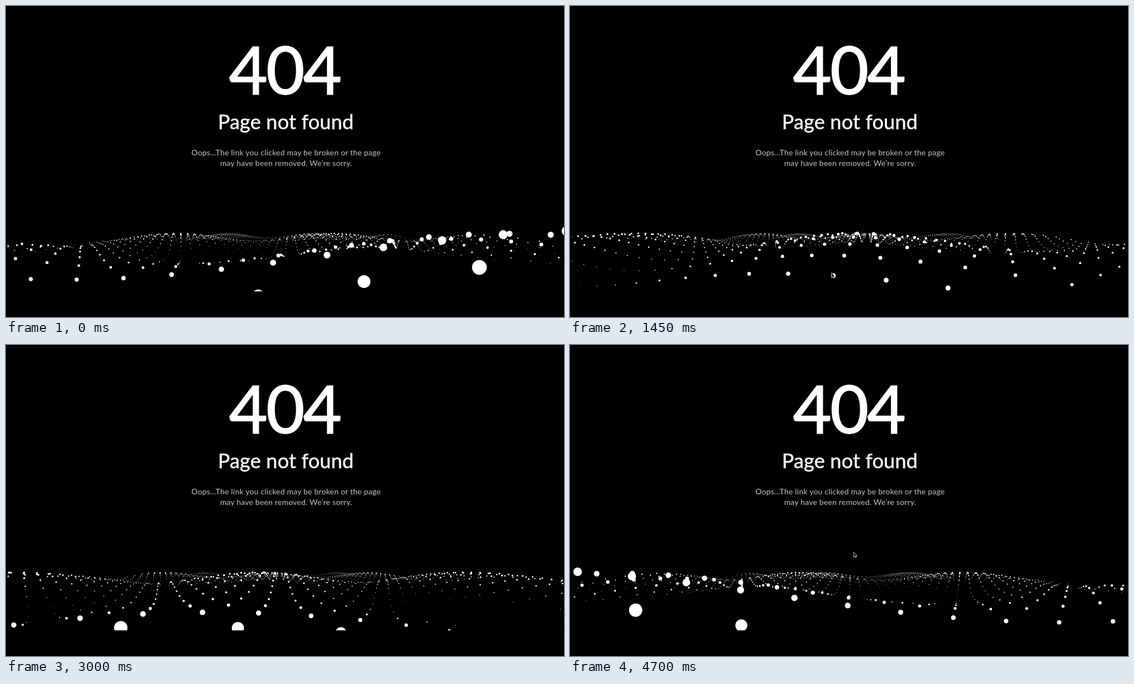
An HTML page with a canvas that plays this animation: 1000x558 px, repeating every 4850 ms.

```html
<!DOCTYPE html>
<html lang="en">
<head>
<meta charset="utf-8">
<title>Page not found</title>
<style>
  html, body { margin: 0; width: 100%; height: 100%; overflow: hidden; background: #000; }
  canvas, svg { position: absolute; left: 0; top: 0; }
  text { font-family: Lato, "Open Sans", sans-serif; text-anchor: middle; fill: #fff; }
  .code { font-size: 119px; letter-spacing: -2.5px; stroke: #fff; stroke-width: 2px; }
  .title { font-size: 36px; letter-spacing: .2px; stroke: #fff; stroke-width: .5px; }
  .note { font-size: 14px; letter-spacing: .2px; fill: #c4c4c4; }
</style>
</head>
<body>
<canvas id="sea" width="1000" height="558"></canvas>
<svg width="1000" height="558">
  <text class="code" x="499.5" y="157.5">404</text>
  <text class="title" x="501.5" y="221">Page not found</text>
  <text class="note" x="502" y="268">Oops...The link you clicked may be broken or the page</text>
  <text class="note" x="502" y="287">may have been removed. We’re sorry.</text>
</svg>
<script>
const ctx = document.getElementById('sea').getContext('2d');
const arrow = new Path2D('M0 0V7L1.7 5.5 3 8.3 4.2 7.8 3 5.2H5Z');
const LOOP = 4850, GRID = 50, GAP = 100, FOCAL = 195;
const CX = 501.5, CY = 427, EYE_Y = 93, EYE_Z = 1000;

// Key points: time, sideways place of the camera, wave phase
const KEYS = [
  [0, 30, 58.05], [950, 174, 61.52], [1450, 166, 63.02], [2500, -53, 65.52],
  [3540, -27, 67.6], [4160, 1.5, 69.2], [4700, 5, 70.5]
];
const TIME = 0, EYE_X = 1, PHASE = 2;

// Pictures are held in a slightly uneven beat, eight to a bar
function holdTime(clock) {
  const bar = 1040, inBar = clock % bar;
  const beat = [0, 120, 290, 410, 530, 660, 830, 950].filter(b => b <= inBar).pop();
  return clock - inBar + beat;
}

// Smooth curve through one column of KEYS
function curve(col, t) {
  const last = KEYS.length - 1;
  let i = 0;
  while (i < last - 1 && t >= KEYS[i + 1][TIME]) i++;
  const slope = k => {
    const a = KEYS[Math.max(k - 1, 0)], b = KEYS[Math.min(k + 1, last)];
    return (b[col] - a[col]) / (b[TIME] - a[TIME]);
  };
  const from = KEYS[i], to = KEYS[i + 1];
  const h = to[TIME] - from[TIME], s = (t - from[TIME]) / h, r = 1 - s;
  return from[col] * (1 + 2 * s) * r * r + to[col] * s * s * (3 - 2 * s)
    + h * s * r * (slope(i) * r - slope(i + 1) * s);
}

function drawWaves(t) {
  const eyeX = curve(EYE_X, t), phase = curve(PHASE, t);
  // The camera always looks at the centre of the grid
  const flat = Math.hypot(eyeX, EYE_Z), dist = Math.hypot(flat, EYE_Y);
  const sinYaw = eyeX / flat, cosYaw = EYE_Z / flat;
  const sinPitch = EYE_Y / dist, cosPitch = flat / dist;
  ctx.fillStyle = '#fff';
  for (let ix = 0; ix < GRID; ix++) {
    const waveX = Math.sin((ix + phase) * 0.3);
    const dx = (ix - GRID / 2) * GAP - eyeX;
    for (let iz = 0; iz < GRID; iz++) {
      const waveZ = Math.sin((iz + phase) * 0.5);
      const dz = EYE_Z - (iz - GRID / 2) * GAP;
      const drop = EYE_Y - 50 * (waveX + waveZ);
      const ahead = dz * cosYaw - dx * sinYaw;
      const depth = ahead * cosPitch + drop * sinPitch;
      if (depth < 1) continue;
      const scale = FOCAL / depth;
      const x = CX + scale * (dx * cosYaw + dz * sinYaw);
      const y = CY + scale * (drop * cosPitch - ahead * sinPitch);
      const radius = scale * 2 * (waveX + waveZ + 2) + 0.12;
      ctx.beginPath();
      ctx.arc(x, y, radius, 0, 2 * Math.PI);
      ctx.fill();
    }
  }
}

function cursorAt(t) {
  if (t >= 4060) return [508.5, 372.5];
  if (t < 950 || t > 2620) return null;
  const glide = (a, b, s) => a + (b - a) * Math.min(s, 1);
  return t < 1450
    ? [glide(653, 469, (t - 950) / 500), glide(489.5, 479.5, (t - 950) / 500)]
    : [glide(469, 416.5, (t - 1450) / 1050), glide(479.5, 486, (t - 1450) / 1050)];
}

function drawCursor(x, y) {
  ctx.save();
  ctx.translate(x, y);
  ctx.fillStyle = '#000';
  ctx.strokeStyle = '#ddd';
  ctx.lineWidth = 1.5;
  ctx.stroke(arrow);
  ctx.fill(arrow);
  ctx.restore();
}

function frame(now) {
  const t = holdTime(now % LOOP);
  ctx.clearRect(0, 0, 1000, 558);
  ctx.save();
  ctx.beginPath();
  ctx.rect(3, 300, 997, 212);
  ctx.clip();
  drawWaves(t);
  ctx.restore();
  const cursor = cursorAt(t);
  if (cursor) drawCursor(...cursor);
  requestAnimationFrame(frame);
}
requestAnimationFrame(frame);
</script>
</body>
</html>
```
